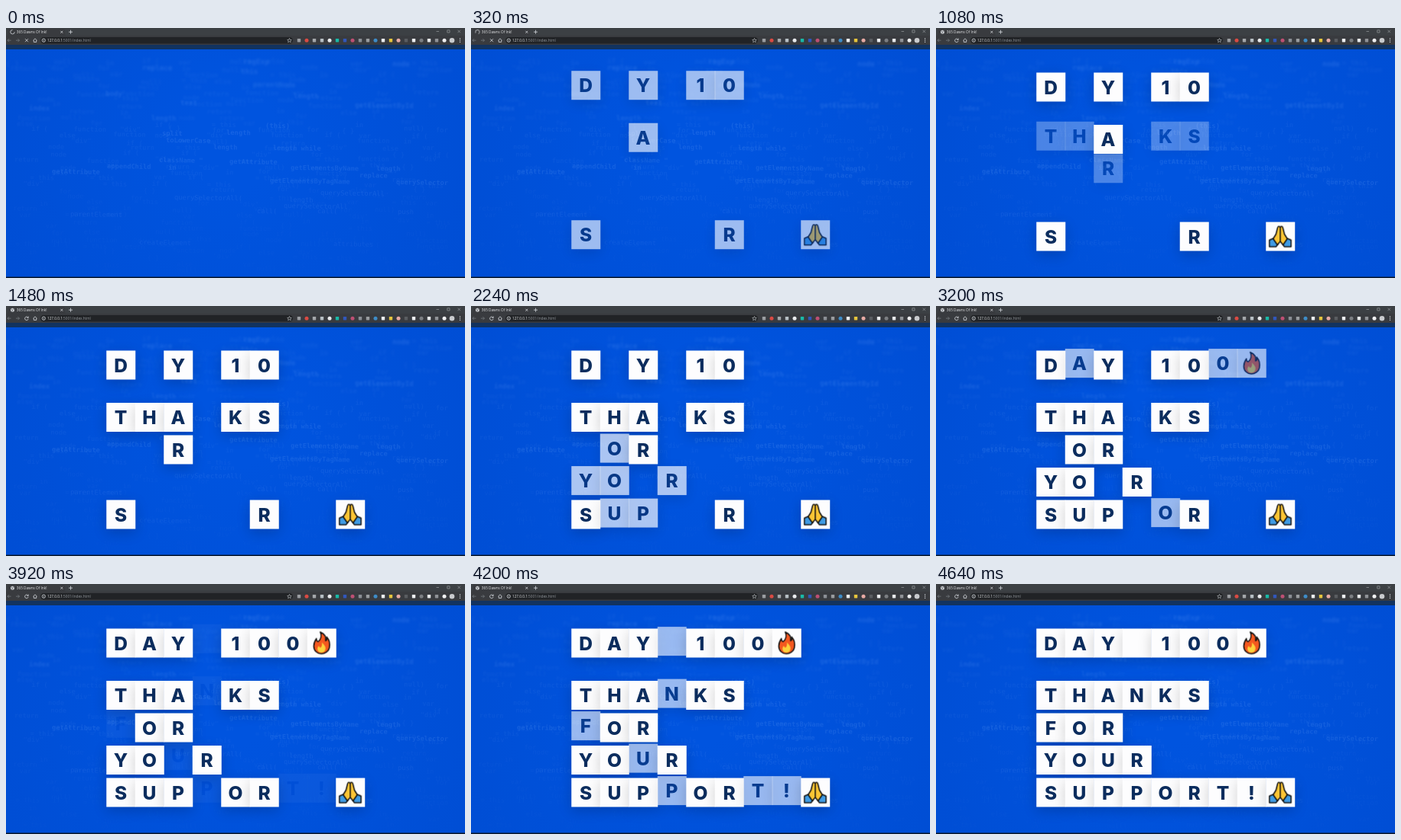
An HTML page with a canvas that plays this animation: 600 by 328 pixels, repeating every 7640 ms.

```html
<!DOCTYPE html>
<html lang="en">
<head>
<meta charset="utf-8">
<title>Letter tiles</title>
<style>
  html, body { margin: 0; width: 100%; height: 100%; overflow: hidden; background: #0052dc; }
  #stage { position: relative; width: 600px; height: 328px; overflow: hidden; }
  #stage > canvas, #chrome { position: absolute; left: 0; top: 0; }
  #chrome text { font-family: "Open Sans", "Noto Sans", sans-serif; font-size: 4.7px; fill: #e4e6e8; }
  .tile {
    position: absolute; left: 0; top: 0; width: 37.5px; height: 37.5px;
    background: #fdfdfe; color: #0c2d5e;
    font: 800 24.5px/38.8px Inter, "Open Sans", sans-serif; text-align: center;
    box-shadow: 0 5px 17px rgba(0, 0, 0, .18);
  }
  .tile svg { display: block; }
</style>
</head>
<body>
<div id="stage">
  <canvas id="back" width="600" height="328"></canvas>
  <svg id="chrome" width="600" height="328" fill="none" stroke-width=".8">
    <path d="M0 0H600V10H0Z" fill="#3c4044"/>
    <path d="M1 10Q2.500 9.500 2.500 7V3Q2.500 1 4.500 1H75Q77 1 77 3V7Q77 10 79 10Z" fill="#393b3f"/>
    <path d="M0 10H600V22H0Z" fill="#393b3f"/>
    <path d="M0 22H600V28H0Z" fill="#12335f"/>
    <path d="M0 326.500H600V328H0Z" fill="#0b1626"/>
    <rect x="45" y="12" width="330" height="8.500" rx="4.200" fill="#212326"/>
    <g id="load" stroke="#d5d9dd">
      <path id="spin" d="M8.500 2.500A2.700 2.700 0 1 0 11.200 5.200"/>
      <path d="M25 14.200L29 18.200M29 14.200L25 18.200"/>
    </g>
    <g id="done" stroke="#d5d9dd">
      <circle cx="8.500" cy="5.200" r="2.500" fill="#c9ccd0" stroke="none"/>
      <path d="M7 4L8.500 5.200L8 7M9.500 3.500L10.300 5" stroke="#55585c"/>
      <path d="M28.600 14.800A2.300 2.300 0 1 0 29.200 16.800M29.200 13.600V15.500H27.300"/>
    </g>
    <text x="13.800" y="7">365 Dawns Of Ink!</text>
    <g stroke="#d5d9dd">
      <path d="M71.300 3.800L74.300 6.800M74.300 3.800L71.300 6.800M82 5.200H87M84.500 2.700V7.700"/>
      <path d="M6.500 16.200H2M4 14.200L2 16.200L4 18.200M13 16.200H17.500M15.500 14.200L17.500 16.200L15.500 18.200" stroke="#777b80"/>
      <path d="M35.500 16.200L38 13.900L40.500 16.200M36.300 16V18.500H39.700V16"/>
      <circle cx="49.300" cy="16.200" r="2.200"/><path d="M49.300 15.800V17.400M49.300 14.700V15.200"/>
      <path d="M562.500 4.500H566M576.800 2.800H580V6H576.800ZM590.500 2.700L594 6.200M594 2.700L590.500 6.200" stroke="#a4a8ac" stroke-width=".6"/>
    </g>
    <text x="54" y="18">127.0.0.1<tspan fill="#92979c">:5001/index.html</tspan></text>
    <path d="M370.500 13.500L371.300 15.400L373.300 15.500L371.800 16.800L372.300 18.800L370.500 17.700L368.700 18.800L369.200 16.800L367.700 15.500L369.700 15.400Z" stroke="#c5c9cd" stroke-width=".6"/>
    <g id="icons"></g>
  </svg>
</div>
<script>
const LOOP = 7640, FADE = 500, SIZE = 37.5, LEFT = 131.25;
const stage = document.getElementById('stage');
const byId = id => document.getElementById(id);

function paintBack() {
  const c = byId('back').getContext('2d');
  const glow = c.createRadialGradient(300, 150, 60, 300, 160, 380);
  glow.addColorStop(0, '#0054df');
  glow.addColorStop(1, '#004dd3');
  c.fillStyle = glow;
  c.fillRect(0, 0, 600, 328);

  const write = (word, x, y, strength) => {
    const far = Math.max(0, (165 - y) / 135);
    const low = Math.max(0, (y - 205) / 120);
    c.save();
    c.translate(x, y);
    c.rotate(.015);
    c.filter = `blur(${(.4 + far * 1.5 + low * .2).toFixed(2)}px)`;
    c.font = `${y < 215 ? 'bold ' : ''}${(8.7 + far * .8).toFixed(1)}px "DejaVu Sans Mono", monospace`;
    c.fillStyle = `rgba(125,178,255,${strength * (1 + far * .5 - low * .5)})`;
    c.fillText(word, 0, 0);
    c.restore();
  };

  let seed = 29;
  const rnd = () => (seed = seed * 16807 % 2147483647) / 2147483647;
  const tokens = ['var', 'if (', 'function', '= this', 'return', 'null)', 'for', '"div"', 'in', '{ }', 'node', 'else'];
  for (let y = 46; y < 320; y += 8) {
    for (let x = rnd() * 90; x < 570; x += 40 + rnd() * 75) {
      write(tokens[Math.floor(rnd() * tokens.length)], x, y + rnd() * 4, .065);
    }
  }

  const words = [
    ['regExp', 310, 47], ['replace', 178, 55], ['node', 505, 50], ['this', 307, 60],
    ['parentNode', 323, 77], ['body', 130, 89], ['length', 376, 92], ['text', 228, 101],
    ['getElementById', 456, 104], ['index', 30, 108], ['length', 190, 121], ['(this)', 339, 131],
    ['length', 288, 140], ['split', 204, 141], ['toLowerCase', 209, 150], ['length', 271, 159],
    ['length while', 349, 160], ['className "', 200, 176], ['getAttribute', 292, 178],
    ['appendChild', 132, 184], ['in', 212, 186], ['getElementsByName', 372, 186], ['length', 484, 187],
    ['getAttribute', 60, 191], ['replace', 462, 196], ['getElementsByTagName', 345, 203],
    ['querySelector', 510, 205], ['querySelectorAll', 411, 219], ['querySelectorAll(', 220, 225],
    ['length', 370, 228], ['querySelectorAll', 363, 236], ['call(', 328, 243], ['call(', 407, 243],
    ['parentElement', 84, 247], ['push', 512, 244], ['createElement', 174, 284], ['attributes', 428, 286]
  ];
  words.forEach(([word, x, y]) => write(word, x, y, .15));
}

function paintIcons() {
  const colours = ['#9a9da1', '#d94a43', '#a4a7aa', '#b6bec3', '#e9ebed', '#19b9a7', '#3157ba',
    '#bd4f73', '#8b8f95', '#999c9f', '#3e8cc7', '#eceef0', '#e5c43d', '#e7aaa4',
    '#5a5d61', '#edf0f2', '#7b7e82', '#e7e9eb', '#8f9296', '#f0f1f2', '#c9cbce'];
  byId('icons').innerHTML = colours.map((fill, i) => {
    const x = 383 + i * 10;
    return i % 3 === 1 || i === 20
      ? `<circle cx="${x}" cy="16.2" r="${i === 20 ? 3.3 : 2.5}" fill="${fill}"/>`
      : `<rect x="${x - 2.2}" y="14" width="4.400" height="4.400" rx=".6" fill="${fill}"/>`;
  }).join('') + [14, 16.2, 18.4].map(y => `<circle cx="593.5" cy="${y}" r=".65" fill="#d5d9dd"/>`).join('');
}

const icon = body => `<svg width="37.5" height="37.5" stroke="#111" stroke-width="1.5" stroke-linejoin="round">${body}</svg>`;
const fire = icon(
  `<path fill="#f4581f" d="M17 4.500C23 7 25 11 24 16C26 15 26 13 25.500 11C29 15 30 20 29 25C28 30 23 33 18.500 33C13 33 8.500 29 8.500 23C8.500 19 10 16 12 13C12 16 13 17 14.500 17C18 14 19 9 17 4.500Z"/>
   <path fill="#fdd23c" stroke="none" d="M19 18C22 21 25 24 23.500 28C22.500 32.500 15 32.800 13.500 28C13 25.500 14 24 15 22.500C16 25 17 25 18 24.500C19.500 22.500 19.500 20 19 18Z"/>`);
const half =
  `<path fill="#3f9be4" d="M9.800 21.500L4.600 23.800V32.500H13.200L16 29Z"/>
   <path fill="#fcc534" d="M18.750 7.500C18 5 15.800 5.200 15.300 7.500L13.200 16L9.500 22L15 30L18.750 25.500Z"/>`;
const hands = icon(`${half}<g transform="matrix(-1 0 0 1 37.500 0)">${half}</g>`);

// Each row: top, glyphs, and the wave in which each glyph arrives
const rows = [
  [58.5, [...'DAY 100', fire], '03040033'],
  [127, [...'THANKS'], '110411'],
  [169.5, [...'FOR'], '421'],
  [212, [...'YOUR'], '2242'],
  [254.5, [...'SUPPORT!', hands], '022430440']
];
const starts = [10, 935, 1900, 2900, 3900];
const play = (el, frames) => el.animate(frames, { duration: LOOP, iterations: Infinity });

function addTile(glyph, x, y, start) {
  const el = document.createElement('div');
  el.className = 'tile';
  el.innerHTML = glyph;
  stage.append(el);
  const hidden = { opacity: 0, transform: `translate(${x}px, ${y - 6}px)` };
  const shown = { opacity: 1, transform: `translate(${x}px, ${y}px)` };
  play(el, [
    { ...hidden, offset: 0 }, { ...hidden, offset: start / LOOP },
    { ...shown, offset: (start + FADE) / LOOP }, { ...shown, offset: 1 }
  ]);
}

function swapAt(el, time, before) {
  const at = time / LOOP;
  play(el, [
    { opacity: before, offset: 0 }, { opacity: before, offset: at },
    { opacity: 1 - before, offset: at }, { opacity: 1 - before, offset: 1 }
  ]);
}

paintBack();
paintIcons();
rows.forEach(([y, glyphs, waves]) =>
  glyphs.forEach((glyph, i) => addTile(glyph, LEFT + i * SIZE, y, starts[waves[i]])));
swapAt(byId('load'), 400, 1);
swapAt(byId('done'), 400, 0);
byId('spin').style.transformOrigin = '8.5px 5.2px';
play(byId('spin'), [{ transform: 'rotate(0deg)' }, { transform: 'rotate(3600deg)' }]);
</script>
</body>
</html>
```
